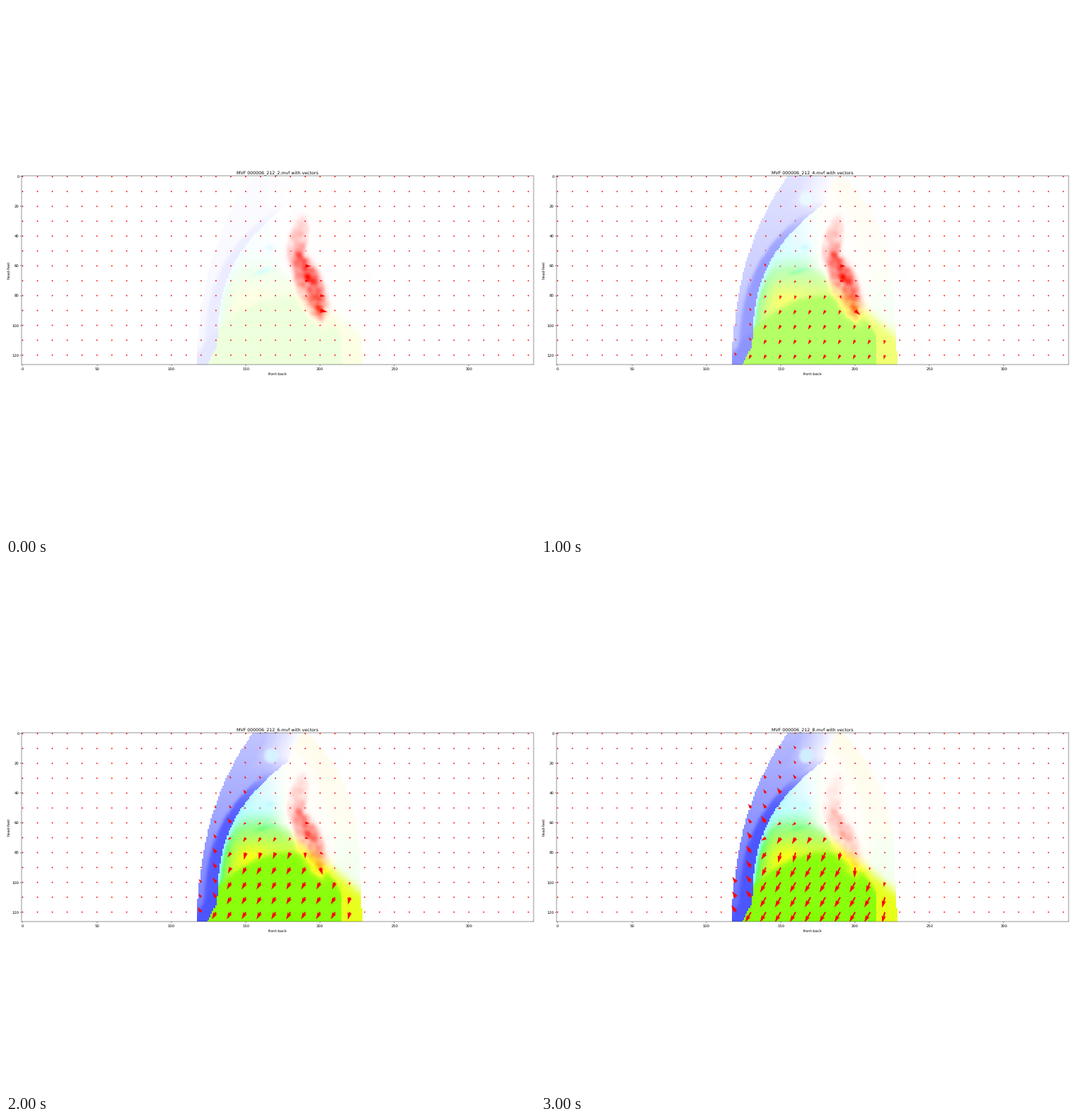
These frames come from a looping animation (748x748 px, 3500 ms). A matplotlib script:

```python
import numpy as np
import matplotlib.pyplot as plt
from matplotlib.animation import FuncAnimation

plt.rcParams.update({"font.family": "DejaVu Sans", "text.hinting": "none"})

SIZE, DPI = 748, 37.4
W, H, CELL = 344, 127, 2.1033
LEFT, TOP = 22.4, 240.2
FRAMES = 7
PEAK, RED_PEAK = 18.0, 12.5         # vector lengths in pixels

Y, X = np.mgrid[0:H, 0:W].astype(float)


def step(d, w):
    return 1 / (1 + np.exp(-np.clip(d / w, -50, 50)))


def contour(*points):
    """Cubic column position per row through four (row, column) points."""
    rows, cols = zip(*points)
    return np.polyval(np.polyfit(rows, cols, 3), Y)


def polar(amp, deg):
    return amp * np.exp(1j * np.radians(deg))


def mix(a, b, w):
    return a * (1 - w) + b * w


def spot(x, y, sx, sy, tilt=0.0):
    dx = X - x
    dy = Y - y - tilt * dx
    return np.exp(-(dx / sx) ** 2 / 2 - (dy / sy) ** 2 / 2)


def lobe(x, y, rx, ry, lean):
    return step(1 - np.hypot((X - x - lean * (Y - y)) / rx, (Y - y) / ry), 0.1)


def blur(a, passes):
    for _ in range(passes):
        for axis in (0, 1):
            a = (np.roll(a, 1, axis) + 2 * a + np.roll(a, -1, axis)) / 4
    return a


outer = contour((0, 154.8), (38, 133.8), (80, 121.8), (126, 117.2))
inner = np.minimum(contour((20, 177.6), (46, 150.5), (80, 134.5), (126, 130.5)),
                   188 - 0.5 * Y)
back = contour((0, 191), (42, 219.4), (85, 226.5), (126, 229))
dome = 80 + np.where(X < 180, 0.0098, 0.0225) * (X - 180) ** 2


def moving_field():
    """Unit-scaled motion and the exponent of its growth."""
    gap = X - inner
    edge = np.exp(-np.maximum(gap, 0) / 4)

    # Back half: faint, stronger close to the dome
    near = 0.02 + 0.45 * np.exp(-np.maximum(dome - Y, 0) / 5)
    rim = 0.05 * step(X - back + 16, 2)
    field = (polar(near * step(209 - X, 1.5), 95)
             + polar(rim, 85 + 50 * step(Y - 68, 6)))

    # Front half: turns from leftward to downward with depth
    depth = 0.05 + 0.83 * step(Y - 65, 10)
    amp = mix(depth, 0.34 * step(Y - 35, 6), edge) + 0.12 * spot(153, 82, 9, 7)
    deg = 104 + 80 * step(60 - Y, 7.5) - 7 * spot(153, 82, 9, 7)
    deg = mix(deg, 172, edge)
    reach = step(171 + 1.2 * np.maximum(Y - 60, 0) - X, 2.8)
    field = mix(field, polar(amp, deg), reach)

    # Large uniform area under the dome
    under = step(Y - dome, 1.0) * (X <= 214)
    field = mix(field, polar(0.92 + 0.05 * spot(178, 124, 8, 4), 119.5), under)
    field = field * ((gap >= 0) & (X <= back))

    # Front wall with its darker inner strip
    wall = (X >= outer) & (gap < 0)
    strip = step(gap + 5 + 0.035 * Y, 0.7) * step(Y - 20, 2)
    amp = mix(0.27 + 0.34 * Y / H, 0.68 * step(Y - 28, 8), strip)
    amp = amp * mix(np.clip(-gap / 24, 0, 1), 1, step(Y - 20, 2))
    field = np.where(wall, polar(amp, 236), field)
    bubble = step(4.6 - np.hypot(X - 167.5, Y - 15.5), 0.5)
    field = mix(field, polar(0.18, 190), bubble)

    power = np.where(wall, mix(1.45, 1.1, strip), 1.05)
    return field, mix(power, 1.0, under)


def lobe_field():
    """Rightward motion in two mottled lobes."""
    noise = blur(np.random.default_rng(6).random((H, W)), 4)
    noise = np.clip(0.5 + (noise - 0.5) * 4, 0, 1)
    ridge = np.exp(-((X - 189 - 0.33 * (Y - 58)) / 3.5) ** 2 / 2)
    amp = lobe(193.5, 74.5, 9.5, 21, 0.3) * (0.18 + 0.2 * noise
                                             + ridge * (0.2 + 0.4 * noise))
    amp += lobe(185, 44, 6.5, 15.5, -0.2) * (0.08 + 0.16 * noise
                                             + 0.16 * spot(187, 49, 3, 4))
    return RED_PEAK * polar(amp / amp.max(), 3)


def flow_color(field):
    """Colour wheel: direction gives the hue, relative length the strength."""
    mag = np.abs(field)
    deg = np.degrees(np.angle(field)) % 360
    knots = np.cumsum([0, 15, 6, 4, 11, 13, 6]) * 360 / 54
    wheel = [[1, 1, 0, 0, 0, 1, 1], [0, 1, 1, 1, 0, 0, 0], [0, 0, 0, 1, 1, 1, 0]]
    rgb = np.stack([np.interp(deg, knots, c) for c in wheel], -1)
    return 1 - (mag / mag.max())[..., None] * (1 - rgb)


MOVE, POWER = moving_field()
LOBES = lobe_field()
STREAKS = -1.5 * spot(162, 64, 4, 1.2, -0.35) - spot(166.5, 48, 2, 1.3)


def field_at(k):
    g = 0.1 + 0.9 * (k / (FRAMES - 1)) ** 0.95
    return PEAK * g ** POWER * MOVE + LOBES * (1 - 0.45 * g * g) + STREAKS


fig = plt.figure(figsize=(SIZE / DPI, SIZE / DPI), dpi=DPI, facecolor="white")
ax = fig.add_axes([LEFT / SIZE, 1 - (TOP + H * CELL) / SIZE,
                   W * CELL / SIZE, H * CELL / SIZE])
image = ax.imshow(np.ones((H, W, 3)), interpolation="nearest", aspect="auto")
ax.set_xlabel("front-back")
ax.set_ylabel("head-feet")
ax.set_xticks(range(0, 301, 50))
ax.set_yticks(range(0, 121, 20))
title = ax.set_title("")

grid = np.s_[::10, ::10]
arrows = ax.quiver(X[grid], Y[grid], 0 * X[grid], 0 * X[grid], color="red",
                   scale=1, scale_units="dots")
ax.set_xlim(-0.5, W - 0.5)
ax.set_ylim(H - 0.5, -0.5)


def update(k):
    field = field_at(k)
    image.set_data(np.clip(flow_color(field), 0, 1))
    arrows.set_UVC(field.real[grid], -field.imag[grid])
    title.set_text(f"MVF 000006_212_{k + 2}.mvf with vectors")
    return image, arrows, title


anim = FuncAnimation(fig, update, frames=FRAMES, interval=500,
                     repeat=True, repeat_delay=0, blit=False)
plt.show()
```
